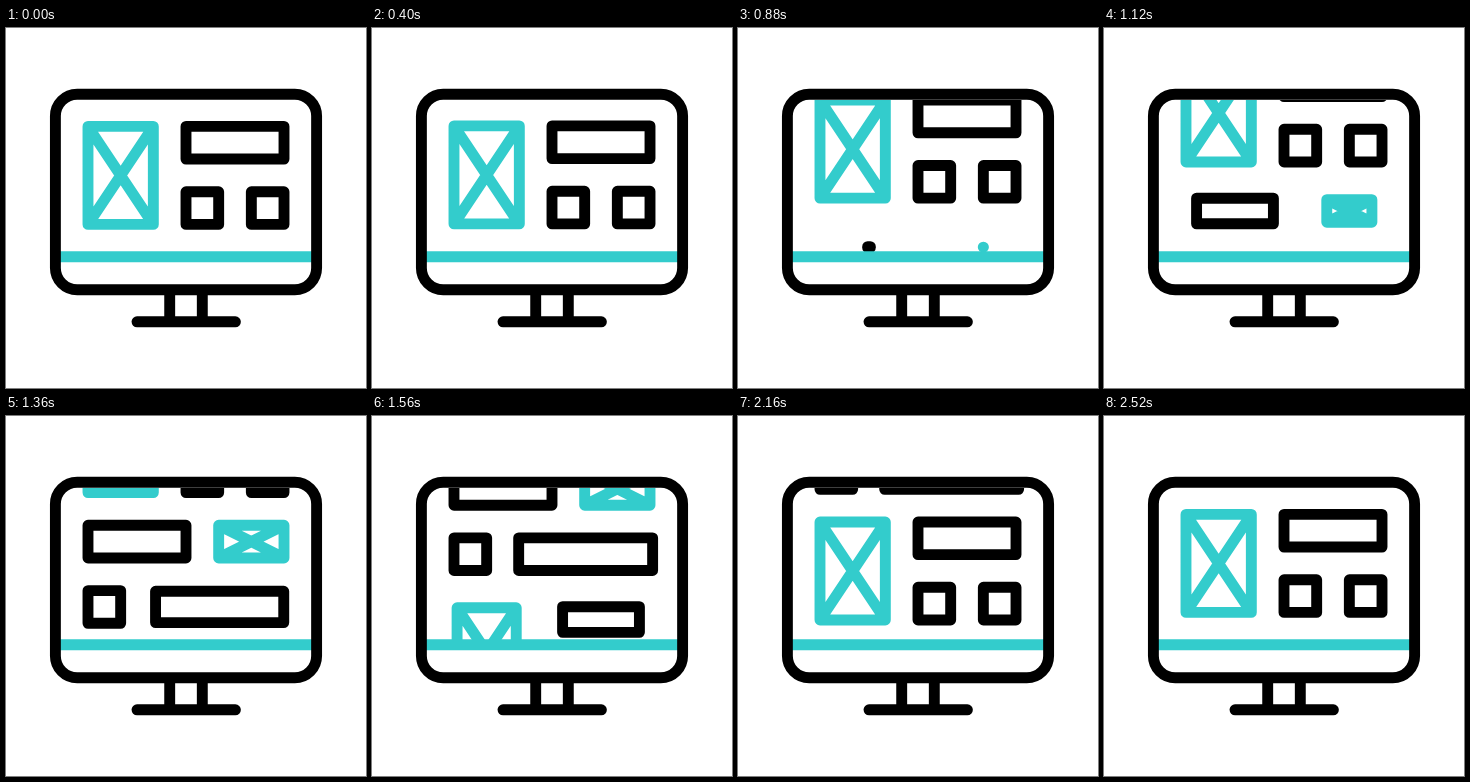
Animation, 360 px wide and 360 px high, one loop 3 s. Source, as an HTML page:

```html
<!DOCTYPE html>
<html lang="en">
<head>
<meta charset="utf-8">
<title>Wireframe scroll</title>
<style>
  html, body { margin: 0; width: 100%; height: 100%; overflow: hidden; background: #fff; }
  svg { display: block; width: 100%; height: 100%; }
  path, rect { fill: none; stroke: #000; stroke-width: 10.9; stroke-linejoin: round; }
  .teal { stroke: #33cccc; }
</style>
</head>
<body>
<svg viewBox="0 0 360 360">
  <defs><clipPath id="screen"><path d="M50 72H310V229H50Z"/></clipPath></defs>
  <g clip-path="url(#screen)"><g id="page"></g></g>
  <path class="teal" d="M52 228.7H308"/>
  <rect x="49.4" y="66.2" width="261.2" height="195.6" rx="21.8"/>
  <path d="M163.7 262V294M196.3 262V294"/>
  <path d="M131 293.8H229.4" stroke-linecap="round"/>
</svg>
<script>
const LOOP = 3000, STEP = 40;
const SCROLL_START = 310, SCROLL_END = 2490, EASE = 0.56;
const POP = 400;
const UNIT = 32.67, LEFT = 180, TOP = 98.4, TRAVEL = 8 * UNIT;

// Grid column, row, width, height, kind, time at which the block grows in
const blocks = [
  [-3, 0, 2, 3, "image", -POP],
  [0, 0, 3, 1, "box", -POP],
  [0, 2, 1, 1, "box", -POP],
  [2, 2, 1, 1, "box", -POP],
  [-3, 4, 3, 1, "box", 840],
  [1, 4, 2, 1, "image", 868],
  [-3, 6, 1, 1, "box", 950],
  [-1.02, 6, 4.1, 1, "box", 1010],
  [-3, 8, 2, 3, "image", 1236],
  [0, 8, 3, 1, "box", 1280],
  [0, 10, 1, 1, "box", 1320],
  [2, 10, 1, 1, "box", 1350]
];

const page = document.getElementById("page");
const clamp = v => Math.min(1, Math.max(0, v));
const smooth = v => v * v * (3 - 2 * v);

// Symmetric cubic-bezier(EASE, 0, 1 - EASE, 1), solved by bisection
function bezier(x) {
  if (x <= 0 || x >= 1) return clamp(x);
  let lo = 0, hi = 1;
  for (let i = 0; i < 24; i++) {
    const s = (lo + hi) / 2, r = 1 - s;
    const at = 3 * EASE * s * r * r + 3 * (1 - EASE) * s * s * r + s ** 3;
    if (at < x) lo = s; else hi = s;
  }
  return smooth(lo);
}

const shapes = blocks.map(([col, row, cols, rows, kind, start]) => {
  const el = document.createElementNS("http://www.w3.org/2000/svg", "path");
  if (kind === "image") el.setAttribute("class", "teal");
  page.appendChild(el);
  return {
    el, kind, start,
    x: LEFT + (col + cols / 2) * UNIT,
    y: TOP + (row + rows / 2) * UNIT,
    w: cols * UNIT / 2,
    h: rows * UNIT / 2
  };
});

// Outlines are rebuilt at each size so the stroke keeps its weight
function outline({ x, y, w, h, kind }, scale) {
  const l = x - w * scale, r = x + w * scale;
  const t = y - h * scale, b = y + h * scale;
  const cross = kind === "image" ? `M${l} ${t}L${r} ${b}M${r} ${t}L${l} ${b}` : "";
  return `M${l} ${t}H${r}V${b}H${l}Z${cross}`;
}

function draw(time) {
  const t = Math.floor((time % LOOP) / STEP) * STEP;
  const shift = TRAVEL * bezier((t - SCROLL_START) / (SCROLL_END - SCROLL_START));
  page.setAttribute("transform", `translate(0 ${-shift})`);
  for (const shape of shapes) {
    const scale = smooth(clamp((t - shape.start) / POP));
    shape.el.setAttribute("d", scale > 0 ? outline(shape, scale) : "");
  }
}

const begin = performance.now();
function tick() {
  draw(performance.now() - begin);
  requestAnimationFrame(tick);
}
tick();
</script>
</body>
</html>
```
